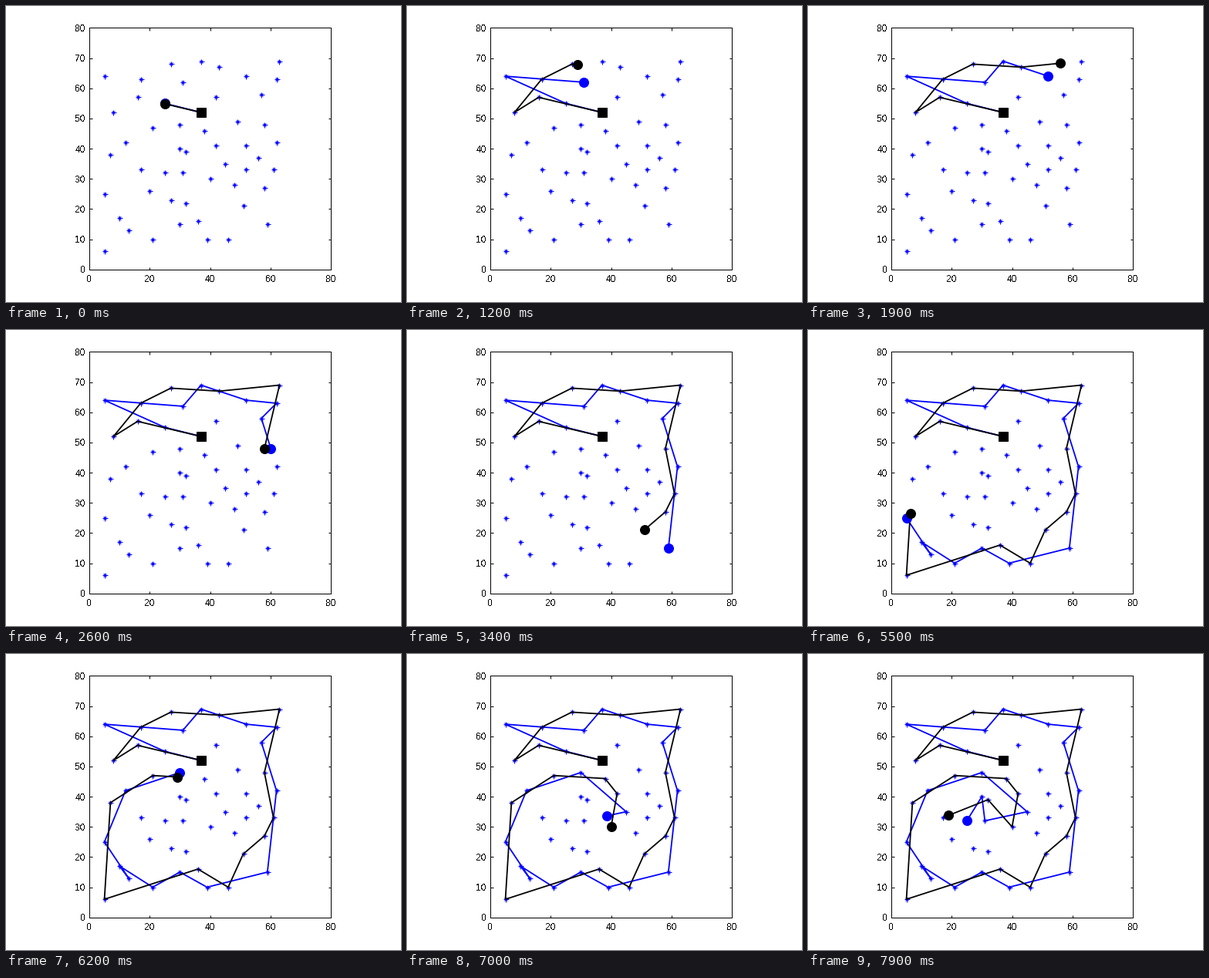
These frames come from a looping animation (512x384 px, 8 s). A matplotlib script:

```python
import numpy as np
import matplotlib.pyplot as plt
from matplotlib.animation import FuncAnimation

W, H, DPI = 512, 384, 64
PX = 72 / DPI  # points per pixel
FRAMES, STEP_MS = 80, 100
SERVICE = 1.0  # time spent at each stop, in units of travel at speed 1
BLUE, BLACK = "#0000ff", "#000000"

plt.rcParams.update({
    "font.family": "Liberation Sans",
    "font.size": 12 * PX,
    "text.antialiased": False,
})

# Key points: the two tours and the customers nobody has reached yet
DEPOT = (37, 52)
BLUE_STOPS = [
    (25, 55), (5, 64), (31, 62), (37, 69), (52, 64), (62, 63), (57, 58),
    (62, 42), (59, 15), (39, 10), (30, 15), (21, 10), (10, 17), (13, 13),
    (5, 25), (12, 42), (30, 48), (45, 35), (31, 32), (30, 40), (25, 32),
]
BLACK_STOPS = [
    (16, 57), (8, 52), (17, 63), (27, 68), (43, 67), (63, 69), (58, 48),
    (61, 33), (58, 27), (51, 21), (46, 10), (36, 16), (5, 6), (7, 38),
    (21, 47), (38, 46), (42, 41), (40, 30), (32, 39), (17, 33),
]
UNVISITED = [
    (42, 57), (49, 49), (52, 41), (52, 33), (56, 37),
    (48, 28), (20, 26), (27, 23), (32, 22),
]


class Vehicle:
    """Drives at unit speed from stop to stop, pausing at each one."""

    def __init__(self, ax, stops, color, z):
        self.route = np.array([DEPOT] + stops, float)
        legs = np.hypot(*np.diff(self.route, axis=0).T)
        self.dist = np.concatenate([[0], np.cumsum(legs)])
        arrive = self.dist[1:] + SERVICE * np.arange(len(stops))
        self.events = np.column_stack([arrive, arrive + SERVICE]).ravel()
        self.times = np.concatenate([[0], self.events])
        self.driven = np.concatenate([[0], np.repeat(self.dist[1:], 2)])
        self.trail, = ax.plot([], [], color=color, lw=1.8 * PX, zorder=z,
                              solid_capstyle="butt")
        self.dot, = ax.plot([], [], "o", color=color, ms=12 * PX, mew=PX,
                            zorder=z + 2)

    def show(self, t):
        d = np.interp(t, self.times, self.driven)
        pos = [np.interp(d, self.dist, axis) for axis in self.route.T]
        path = np.vstack([self.route[self.dist < d], pos])
        self.trail.set_data(*path.T)
        self.dot.set_data(*path[-1:].T)
        return self.trail, self.dot


fig = plt.figure(figsize=(W / DPI, H / DPI), dpi=DPI, facecolor="white")
ax = fig.add_axes([108 / W, 42.35 / H, 313 / W, 313.2 / H])
ax.set(xlim=(0, 80), ylim=(0, 80),
       xticks=range(0, 81, 20), yticks=range(0, 81, 10))
ax.tick_params(direction="in", top=True, right=True, length=3.5 * PX, width=PX)
ax.tick_params(axis="x", pad=7 * PX)
ax.tick_params(axis="y", pad=5 * PX)
for spine in ax.spines.values():
    spine.set_linewidth(PX)

# Eight-armed stars: a plus with a smaller cross on it
xs, ys = zip(*(BLUE_STOPS + BLACK_STOPS + UNVISITED))
for marker, size in (("+", 7), ("x", 4.4)):
    ax.plot(xs, ys, marker, color=BLUE, ms=size * PX, mew=PX, zorder=2)

ax.plot(*DEPOT, "s", color=BLACK, ms=12 * PX, mew=PX, zorder=8)
fleet = [Vehicle(ax, BLUE_STOPS, BLUE, 3), Vehicle(ax, BLACK_STOPS, BLACK, 4)]

# One frame per arrival or departure of either vehicle
clock = np.sort(np.concatenate([v.events for v in fleet]))[:FRAMES]


def update(i):
    return [artist for v in fleet for artist in v.show(clock[i])]


anim = FuncAnimation(fig, update, frames=FRAMES, interval=STEP_MS,
                     repeat=True, repeat_delay=0, blit=False)
plt.show()
```
